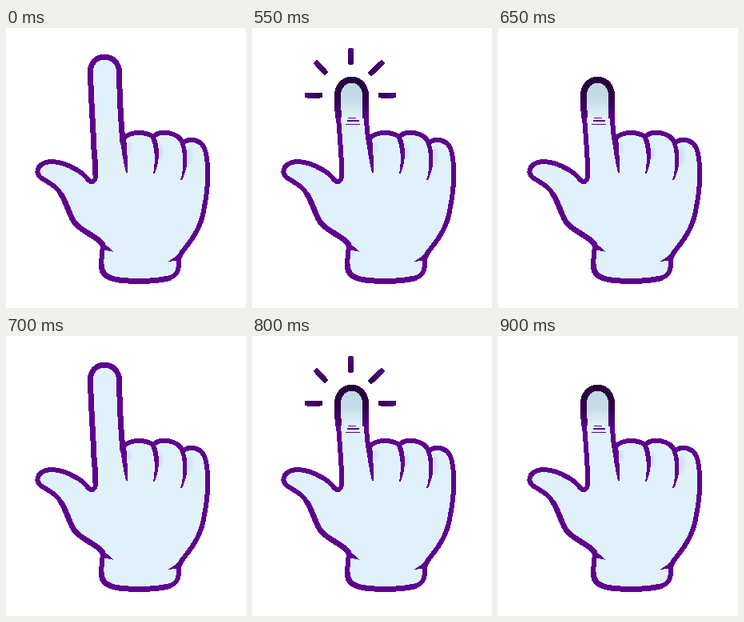
An HTML page without scripts that plays this animation: 300 by 350 pixels, repeating every 950 ms.

```html
<!DOCTYPE html>
<html lang="en">
<head>
<meta charset="utf-8">
<title>Tapping hand</title>
<style>
  html, body { margin: 0; width: 100%; height: 100%; overflow: hidden; background: #fff; }
  svg { display: block; width: 300px; height: 350px; shape-rendering: crispEdges; }

  .skin { fill: #e1f1fa; }
  .line { fill: none; stroke: #5e008e; stroke-width: 6; stroke-linecap: round; stroke-linejoin: round; }
  .thick { stroke-width: 7; }
  .crease { fill: #5e008e; }
  .shade { fill: #cfe6f2; filter: url(#soft); }
  .rays { fill: none; stroke: url(#rayInk); stroke-width: 7; stroke-linecap: round; }

  /* One loop is 19 beats of 50 ms: a long rest, then a double tap. */
  .up, .down, .burst, .full { animation: 950ms step-end infinite; }
  .up { animation-name: up; }
  .down { animation-name: down; }
  .burst { animation-name: burst; }
  .full { animation-name: full; }

  @keyframes up {
    0%, 73.68% { opacity: 1; }
    52.63%, 78.94%, 100% { opacity: 0; }
  }
  @keyframes down {
    0%, 73.68% { opacity: 0; }
    52.63%, 78.94%, 100% { opacity: 1; }
  }
  @keyframes burst {
    0%, 63.15%, 89.47%, 100% { opacity: 0; }
    57.89%, 84.21% { opacity: 1; }
    68.42%, 94.73% { opacity: 0; }
  }
  @keyframes full {
    0%, 68.42%, 94.73%, 100% { opacity: 0; }
    63.15%, 89.47% { opacity: 1; }
  }
</style>
</head>
<body>
<svg viewBox="0 0 300 350">
  <defs>
    <linearGradient id="tipInk" gradientUnits="userSpaceOnUse" x1="0" y1="62" x2="0" y2="116">
      <stop offset="0" stop-color="#26003a"/>
      <stop offset=".5" stop-color="#2f0048"/>
      <stop offset="1" stop-color="#5e008e"/>
    </linearGradient>
    <linearGradient id="tipFill" gradientUnits="userSpaceOnUse" x1="0" y1="68" x2="0" y2="112">
      <stop offset="0" stop-color="#c0d8e4"/>
      <stop offset=".5" stop-color="#c4dce7"/>
      <stop offset=".75" stop-color="#d3e8f2"/>
      <stop offset="1" stop-color="#e1f1fa"/>
    </linearGradient>
    <radialGradient id="rayInk" gradientUnits="userSpaceOnUse" cx="123" cy="84" r="74">
      <stop offset=".45" stop-color="#30004a"/>
      <stop offset="1" stop-color="#650a9e"/>
    </radialGradient>
    <filter id="soft" x="-50%" y="-50%" width="200%" height="200%">
      <feGaussianBlur stdDeviation="1.500"/>
    </filter>
    <path id="hand" d="M112 184 C112 192 107 194 103 190 C98 184 94 180 88 177 C74 169 62 165 50 168
      C38 172 36 182 45 188 C55 194 64 199 69 208 C77 221 79 235 87 245
      C97 255 110 259 120 269 C122 277 119 287 119 296 C118 309 129 314 145 316
      C164 317 187 317 203 313 C216 309 216 301 216 291 C216 285 219 281 224 275
      C234 263 244 247 247 229 C250 213 253 197 252 179 C252 164 250 148 242 143
      C235 138 226 139 221 144 C216 131 194 126 184 136 C174 129 155 129 147 138"/>
    <path id="raised" d="M112 184 C112 172 111 165 110 152 C109 125 106 85 105.500 55
      C105 30 141 30 141.500 55 C142 85 143 110 146 143"/>
    <path id="pressed" d="M112 184 C112 172 112 165 111 155 C110 130 107 112 107 85
      C107 58 142 58 142 85 C142 110 143 125 146 143"/>
  </defs>

  <!-- palm, thumb, folded fingers and cuff -->
  <use href="#hand" class="skin"/>
  <g class="shade">
    <ellipse cx="154" cy="149" rx="3" ry="7"/>
    <ellipse cx="193" cy="155" rx="3" ry="10"/>
    <ellipse cx="229" cy="160" rx="4" ry="12"/>
  </g>
  <use href="#hand" class="line"/>
  <path class="line thick" d="M69 208 C77 221 79 235 87 245 C97 255 110 259 120 269"/>
  <path class="line thick" d="M119.500 297 C119 309 129 314 145 315.500 C164 317 187 316.500 203 313"/>

  <g class="up">
    <use href="#raised" class="skin"/>
    <use href="#raised" class="line thick"/>
  </g>

  <g class="down">
    <use href="#pressed" class="skin"/>
    <path d="M107 85 C107 58 142 58 142 85 L143 113 H108 Z" fill="url(#tipFill)"/>
    <use href="#pressed" class="line"/>
    <path d="M108.500 113 C107 104 107 94 107 85 C107 58 142 58 142 85 C142 96 142 104 142.500 113"
      fill="none" stroke="url(#tipInk)" stroke-width="8"/>
    <path d="M120 112.500 H130 M119 116 H134 M117 120.500 H135"
      fill="none" stroke="#5e008e" stroke-width="1.800"/>
  </g>

  <g class="crease">
    <path d="M142 134 Q145 160 150 181 H152 Q152 160 150 136 Z"/>
    <path d="M180 135 Q189 156 184 182 H186 Q196 155 186 134 Z"/>
    <path d="M216 139 Q226 165 218 190 H220 Q232 166 222 140 Z"/>
    <path d="M118 265 L135 280 Q126 277 120 279 Z"/>
    <path d="M226 270 Q216 285 202 292 Q213 291 219 289 Z"/>
  </g>

  <path class="rays burst" d="M69 84 H85 M81 44 L91 55 M123.500 28 V43 M162 44 L149 56 M161 84 H177"/>
  <path class="rays full" d="M53 84 H85 M71 33 L91 55 M123.500 13 V43 M174 33 L149 56 M161 84 H193"/>
</svg>
</body>
</html>
```
